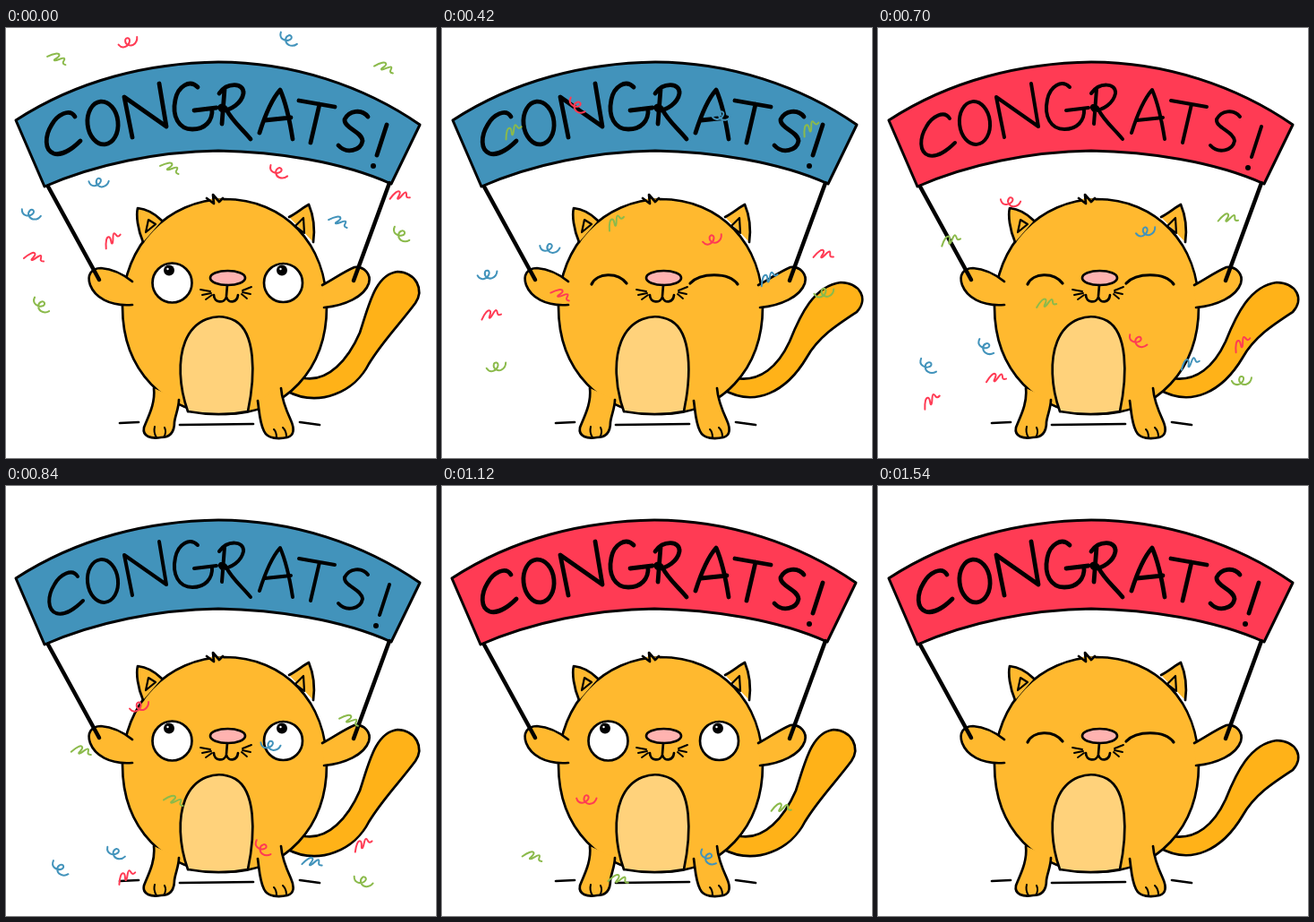
Recreate the animation shown at these times as an HTML page. Size 480 by 480 pixels, loop 1680 ms.

```html
<!DOCTYPE html>
<html lang="en">
<head>
<meta charset="utf-8">
<title>Congrats</title>
<style>
html, body { margin: 0; width: 100%; height: 100%; overflow: hidden; background: #fff; }
svg { display: block; width: 100vw; height: 100vh; fill: none; stroke: #000; stroke-width: 2.7; stroke-linecap: round; stroke-linejoin: round; }
.fur { fill: #ffb92f; }
.tail { fill: #ffb218; }
.dot { fill: #000; stroke: none; }
.white { fill: #fff; }
.confetti { stroke-width: 2; }
</style>
</head>
<body>
<svg viewBox="0 0 480 480" role="img" aria-label="Congrats!">
  <path id="banner" stroke-width="3" d="M11 103C80 58 160 39 237 38C320 38 400 65 462 108L430 174C375 149 300 138 237 137C170 138 100 152 43 177Z"/>

  <g id="lettering">
    <g class="loose">
      <path d="M77 99C71 89 57 97 51 108C43 121 43 136 53 140C62 143 74 135 83 126"/>
      <path d="M425 108L414 142"/><circle class="dot" cx="410" cy="154" r="3"/>
    </g>
    <ellipse cx="108" cy="106" rx="17" ry="24" transform="rotate(-6 108 106)"/>
    <path d="M141 122L132 77L179 110L171 62"/>
    <path d="M214 66C205 57 192 65 189 80C185 99 193 113 208 113C222 113 231 104 230 90M210 92L235 89"/>
    <path d="M244 68L241 107M238 73C247 60 266 61 265 73C263 84 251 92 241 92C235 87 243 84 246 91C252 103 262 111 273 124"/>
    <path d="M283 117C289 98 298 78 306 69C313 85 317 105 320 124M289 103L318 100"/>
    <path d="M327 81L367 88M350 85L340 128"/>
    <path d="M404 99C397 90 383 92 378 102C377 112 397 115 398 126C396 137 380 141 371 131"/>
  </g>

  <path d="M127 441L148 440M194 443L276 442M328 440L350 443"/>

  <path class="tail" data-pose="0" d="M333 391C360 395 382 370 395 340C405 310 412 275 437 272C458 273 467 292 457 307C440 330 420 350 405 375C390 405 350 425 313 405"/>
  <path class="tail" data-pose="1" d="M329 391C355 395 375 378 388 350C400 320 415 288 445 284C468 285 476 303 463 317C440 332 420 345 407 368C385 405 350 425 313 403"/>

  <g class="fur">
    <path d="M244 191C311 191 358 241 358 311C358 381 312 431 245 431C177 431 130 382 130 311C131 242 181 192 244 191Z"/>
    <path d="M153 239C147 225 145 209 147 201C157 202 167 208 174 215"/>
    <path d="M316 211C324 207 332 200 338 197C343 209 345 225 343 239"/>
  </g>
  <path stroke-width="2.200" d="M156 228L159 214L167 219ZM323 221L332 212L333 229Z"/>
  <path stroke="#ffb92f" stroke-width="5" d="M230 193H240"/>
  <path d="M224 190L232 196L231 186L238 194L242 190"/>

  <path fill="#ffd27b" d="M203 428C193 400 192 370 200 350C210 325 235 316 256 327C278 340 279 385 270 428C250 432 225 432 203 428"/>
  <g class="fur">
    <path d="M165 402C167 420 158 435 154 446C152 456 162 459 173 457C184 457 188 450 188 440C189 432 193 424 193 415"/>
    <path d="M281 416C283 430 283 440 288 450C292 459 305 459 314 457C322 455 322 447 318 438C312 425 308 415 307 402"/>
    <path d="M141 283C130 274 118 269 106 268C95 268 90 276 94 287C99 300 115 311 141 309"/>
    <path d="M353 287C365 281 375 273 389 267C400 266 408 275 405 285C400 300 378 310 355 312"/>
  </g>
  <path stroke-width="2" d="M166 445C165 449 166 454 168 457M177 446C179 450 178 454 176 457M299 448C302 451 302 454 302 457M309 446C312 449 313 453 313 456"/>

  <path stroke-width="4.500" d="M47 177L104 281M428 173L388 282"/>

  <g data-pose="0">
    <circle class="white" cx="185.500" cy="284.500" r="22"/>
    <circle class="white" cx="309.500" cy="284.500" r="21.500"/>
    <circle class="dot" cx="182" cy="270.500" r="6"/>
    <circle class="dot" cx="308" cy="270.500" r="6"/>
    <g class="white" stroke="none"><circle cx="180.500" cy="269" r="1.200"/><circle cx="306.500" cy="269" r="1.200"/></g>
  </g>
  <path data-pose="1" stroke-width="3.200" d="M167 286C173 273 196 272 206 285M277 285C288 273 320 272 330 286"/>

  <ellipse cx="247.500" cy="279" rx="19.500" ry="8" fill="#ffb3b0"/>
  <path d="M247 287L246 299M232 298C232 307 244 308 246 300C248 308 258 307 259 298"/>
  <path stroke-width="1.900" d="M217 292L228 294M219 298L229 296M223 303L230 298M264 293L274 289M264 295L273 297M263 297L269 302"/>

  <g id="confetti" class="confetti"></g>
</svg>
<script>
const FRAME = 140, FRAMES = 12, FLOOR = 460;
const BLUE = '#4293bb', GREEN = '#8bba4b', RED = '#ff3b54';
const BANNER = [BLUE, GREEN, RED];
const ZIG = 'M-11 5C-7-2-3-6-1-4C1-2-4 4-2 4C0 4 4-5 6-4C8-3 5 3 11 1';
const CURL = 'M-11-4C-10 4-2 3 1 0C5-4 0-7-2-4C-5 0-1 5 3 5C8 5 10 2 11 0';

const banner = document.getElementById('banner');
const lettering = document.getElementById('lettering');
const loose = lettering.querySelector('.loose');
const confetti = document.getElementById('confetti');
const pieces = [];

function drop(color, shape, x, y, speed) {
  const el = document.createElementNS('http://www.w3.org/2000/svg', 'path');
  el.setAttribute('d', shape);
  el.setAttribute('stroke', color);
  confetti.append(el);
  pieces.push({ el, x, y, speed });
}

drop(GREEN, ZIG, 58, 34, 1.18);
drop(GREEN, ZIG, 423, 44, 0.98);
drop(GREEN, ZIG, 184, 156, 0.88);
drop(GREEN, CURL, 441, 231, 0.95);
drop(GREEN, CURL, 39, 310, 1);
drop(RED, CURL, 137, 16, 1.04);
drop(RED, CURL, 304, 161, 1.1);
drop(RED, ZIG, 118, 236, 0.9);
drop(RED, ZIG, 32, 256, 0.93);
drop(RED, ZIG, 440, 187, 0.96);
drop(BLUE, CURL, 315, 13, 1.25);
drop(BLUE, CURL, 104, 173, 1.07);
drop(BLUE, CURL, 28, 208, 0.99);
drop(BLUE, ZIG, 372, 216, 0.92);

// Speeds up over four frames, then falls steadily.
function fallen(frame) {
  const ramp = Math.min(frame, 4);
  return 7.6 * ramp * ramp + 50 * (frame - ramp);
}

// Pieces gather towards the middle, swaying and rocking as they fall.
function place({ el, x, y, speed }, frame) {
  const left = x + (240 - x) * 0.03 * frame + 6 * Math.sin(frame * Math.PI / 4);
  const top = y + speed * fallen(frame);
  const angle = 35 * Math.sin(frame * 0.9 + x);
  el.style.display = top > FLOOR ? 'none' : '';
  el.setAttribute('transform', `translate(${left} ${top}) rotate(${angle})`);
}

function showPose(pose) {
  for (const el of document.querySelectorAll('[data-pose]'))
    el.style.display = +el.dataset.pose === pose ? '' : 'none';
}

let shown = -1;
function draw(now) {
  const frame = Math.floor(now / FRAME) % FRAMES;
  if (frame !== shown) {
    shown = frame;
    const thin = (frame + 1 >> 1) % 2;
    banner.style.fill = BANNER[frame % 3];
    banner.setAttribute('transform', `translate(${frame % 2} 0)`);
    lettering.style.strokeWidth = thin ? 4 : 4.8;
    loose.setAttribute('transform', `translate(${3 * thin} ${2 * thin})`);
    showPose(frame % 2);
    pieces.forEach(piece => place(piece, frame));
  }
  requestAnimationFrame(draw);
}
draw(performance.now());
</script>
</body>
</html>
```
